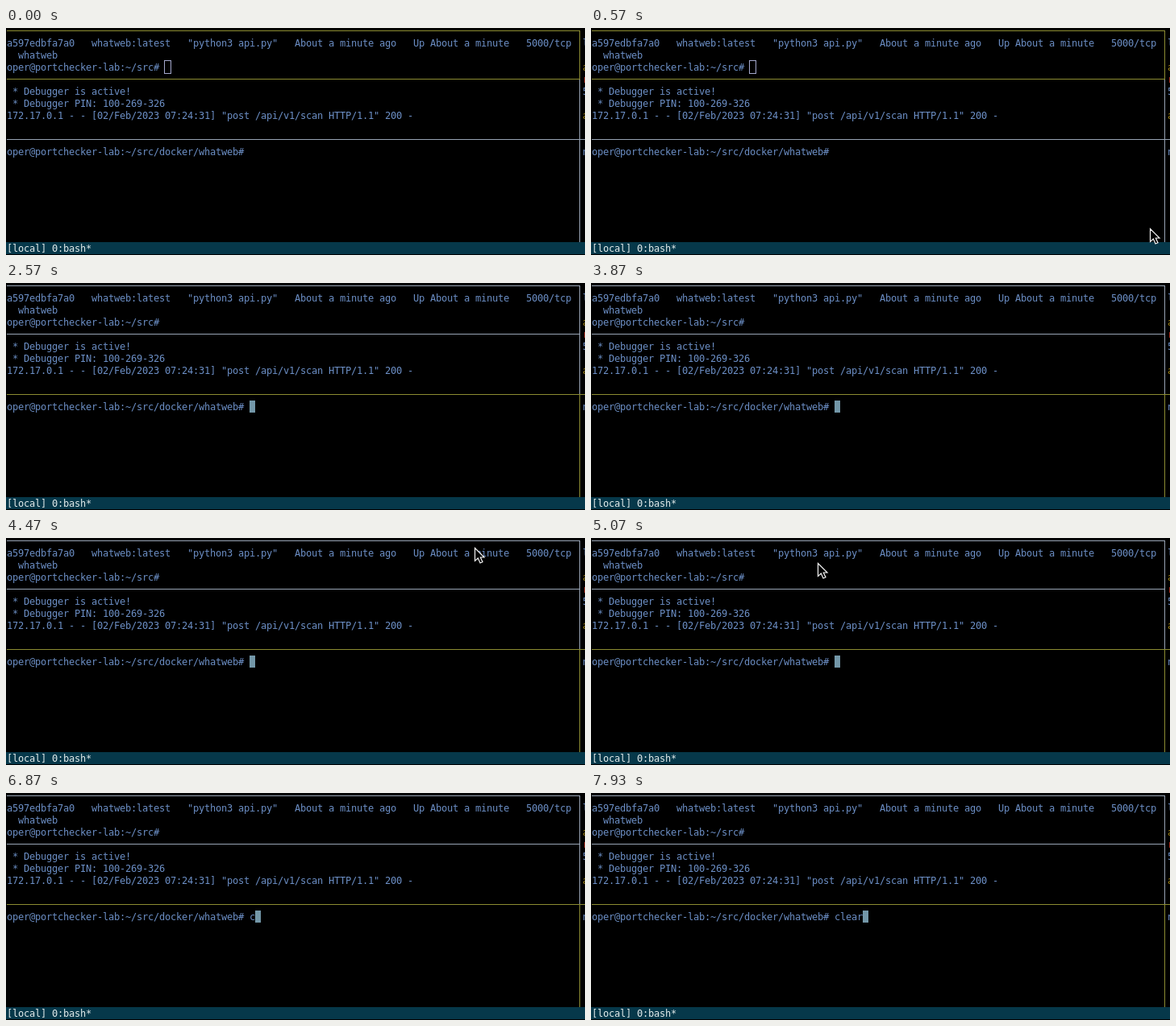
These frames come from a looping animation (718x282 px, 8 s). An HTML page:

```html
<!DOCTYPE html>
<html lang="en">
<head>
<meta charset="utf-8">
<title>Terminal session</title>
<style>
  html, body { margin: 0; width: 100%; height: 100%; overflow: hidden; background: #000; }
  svg { display: block; width: 718px; height: 282px; }
  text {
    font: 12px "DejaVu Sans Mono", monospace;
    letter-spacing: -0.2246px;
    white-space: pre;
    fill: #6c8fc6;
  }
  .border { fill: #98a4b4; }
  .before .upper, .after .lower { fill: #8c8c32; }
  .before #cursor, .after #idleCursor { visibility: hidden; }
</style>
</head>
<body>
<svg id="stage" viewBox="0 0 718 282">
  <rect width="718" height="282"/>
  <g shape-rendering="crispEdges">
    <rect class="border" x="711" y="3" width="1" height="263"/>
    <path class="border upper" d="M1 3H712V64H1V63H711V4H1Z"/>
    <path class="border lower" d="M1 138H718V139H712V266H711V139H1Z"/>
  </g>
  <rect y="266" width="718" height="15" fill="#06384a"/>
  <g id="screen"></g>
  <rect id="idleCursor" x="196.5" y="40.5" width="8" height="16" fill="none" stroke="#a4a8cc"/>
  <rect id="cursor" y="146" width="7" height="15" fill="#7397a8"/>
  <path id="pointer" d="M.5 .5V16.5L4.3 13L7 19L10 17.7L7.3 12H12Z" fill="#000" stroke="#f4f4f4" stroke-width="1.2"/>
</svg>
<script>
const LOOP = 8000, CELL = 7, ROW = 15, FOCUS_AT = 1500;
const TYPE_START = 6850, KEY_GAP = 130;
const $ = id => document.getElementById(id);
const colX = col => 1 + col * CELL;
const baseline = row => row * ROW + 8;

const HOST = 'oper@portchecker-lab';
const PROMPT = HOST + ':~/src/docker/whatweb# ';
const COMMAND = 'clear';

const ROWS = [
  '',
  'a597edbfa7a0   whatweb:latest   "python3 api.py"   About a minute ago   Up About a minute   5000/tcp',
  '  whatweb',
  HOST + ':~/src#',
  '',
  ' * Debugger is active!',
  ' * Debugger PIN: 100-269-326',
  '172.17.0.1 - - [02/Feb/2023 07:24:31] "post /api/v1/scan HTTP/1.1" 200 -'
];

// First column of the neighbouring pane, one character per row
const EDGE = " l ar5'a  n";
const EDGE_COLOURS = { a: '#a08414', r: '#b03020' };

// Mouse visits as key points: time, x, y
const VISITS = [
  [[450, 718, 262], [1180, 569, 183], [1700, 569, 183], [2430, 718, 0]],
  [[4200, 716, 3], [5070, 281, 31], [5870, 84, 53], [6190, 19, 77]]
];

const label = (text, row, col = 0, fill = '') =>
  `<text x="${colX(col)}" y="${baseline(row)}" style="fill:${fill}">${text}</text>`;

$('screen').innerHTML =
  ROWS.map((text, row) => label(text, row)).join('') +
  [...EDGE].map((char, row) => label(char, row, 102, EDGE_COLOURS[char])).join('') +
  label('[local] 0:bash*', 18, 0, '#e4ecec') +
  `<text id="input" x="1" y="${baseline(10)}"></text>`;

function pointerAt(t) {
  const path = VISITS.find(v => t >= v[0][0] && t < v[v.length - 1][0]);
  if (!path) return null;
  const next = path.findIndex(p => p[0] > t);
  const [t0, x0, y0] = path[next - 1], [t1, x1, y1] = path[next];
  const k = (t - t0) / (t1 - t0);
  return [x0 + (x1 - x0) * k, y0 + (y1 - y0) * k].map(Math.round);
}

function render(t) {
  const keys = Math.floor((t - TYPE_START) / KEY_GAP) + 1;
  const typed = Math.min(COMMAND.length, Math.max(0, keys));
  const pos = pointerAt(t);

  $('stage').setAttribute('class', t < FOCUS_AT ? 'before' : 'after');
  $('input').textContent = PROMPT + COMMAND.slice(0, typed);
  $('cursor').setAttribute('x', colX(PROMPT.length + typed));
  $('pointer').setAttribute('visibility', pos ? 'visible' : 'hidden');
  if (pos) $('pointer').setAttribute('transform', `translate(${pos})`);
}

const start = performance.now();
function tick() {
  render((performance.now() - start) % LOOP);
  requestAnimationFrame(tick);
}
tick();
</script>
</body>
</html>
```
